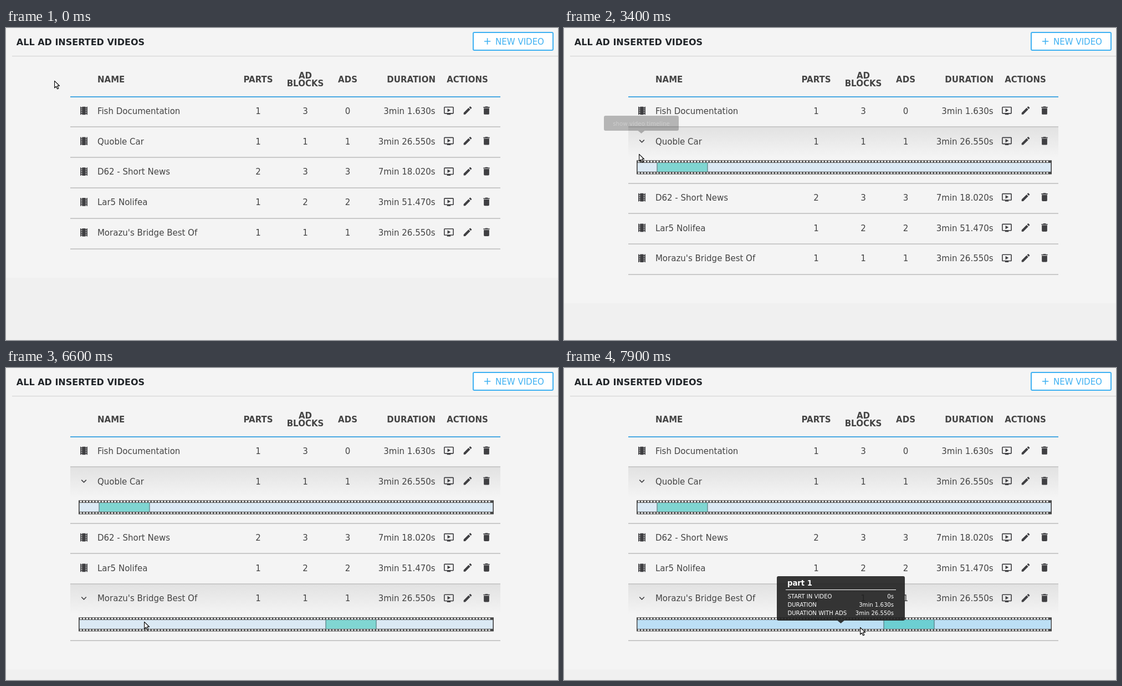
An HTML page with a canvas for the animation above (8000 ms loop, 996 px wide and 562 px high).

```html
<!DOCTYPE html>
<html lang="en">
<head>
<meta charset="utf-8">
<title>All ad inserted videos</title>
<style>
  html, body { margin: 0; width: 100%; height: 100%; overflow: hidden; background: #f0f0f0; }
  canvas { display: block; }
</style>
</head>
<body>
<canvas id="stage" width="996" height="562"></canvas>
<script>
const ctx = document.getElementById('stage').getContext('2d');
const LOOP = 8000, STEP = 100;
const LEFT = 116, RIGHT = 892, HEAD_LINE = 123.5, ROW_H = 54.8, EXTRA = 46.5;
const BLUE = '#3fb1f2', INK = '#444444', ICON_INK = '#3f3f42', PAGE = '#f4f4f4';
const FAMILY = '"DejaVu Sans", sans-serif';

const icons = {
  film: 'M18 3v2h-2V3H8v2H6V3H4v18h2v-2h2v2h8v-2h2v2h2V3h-2zM8 17H6v-2h2v2zm0-4H6v-2h2v2zm0-4H6V7h2v2zm10 8h-2v-2h2v2zm0-4h-2v-2h2v2zm0-4h-2V7h2v2z',
  chevron: 'M16.6 8.6L12 13.2 7.4 8.6 6 10l6 6 6-6z',
  play: 'M21 3H3c-1.1 0-2 .9-2 2v12c0 1.1.9 2 2 2h5v2h8v-2h5c1.1 0 2-.9 2-2V5c0-1.1-.9-2-2-2zm0 14H3V5h18v12zm-5-6l-7 4V7z',
  edit: 'M3 17.25V21h3.75L17.8 9.94l-3.75-3.75zM20.7 7.04c.4-.4.4-1 0-1.4l-2.33-2.35c-.4-.4-1-.4-1.4 0l-1.84 1.83 3.75 3.75z',
  trash: 'M6 19c0 1.1.9 2 2 2h8c1.1 0 2-.9 2-2V7H6zM19 4h-3.5l-1-1h-5l-1 1H5v2h14z',
  plus: 'M19 13h-6v6h-2v-6H5v-2h6V5h2v6h6z'
};
for (const name in icons) icons[name] = new Path2D(icons[name]);

const arrowCursor = new Path2D('M.6 .4V12.9L3.5 10.1 5.6 14.8 7.8 13.9 5.7 9.2H9.6z');
const handCursor = new Path2D('M-1 6V.6C-1-.9 1.4-.9 1.4 .6V4.2C2-.1 4 3.8 4 4.6 4.6 3.9 6.2 4.2 6.2 5.2 7 4.7 8.2 5 8.2 6.4V9.2L7 12.4H-.8L-4.2 8C-5 6.8-3.4 5.6-2.4 6.6L-1 8z');

const rows = [
  { name: 'Fish Documentation', cells: [1, 3, 0], time: '3min 1.630s' },
  { name: 'Quoble Car', cells: [1, 1, 1], time: '3min 26.550s', openAt: 2000, ad: 168 },
  { name: 'D62 - Short News', cells: [2, 3, 3], time: '7min 18.020s' },
  { name: 'Lar5 Nolifea', cells: [1, 2, 2], time: '3min 51.470s' },
  { name: "Morazu's Bridge Best Of", cells: [1, 1, 1], time: '3min 26.550s', openAt: 4800, ad: 577, hoverAt: 6700 }
];
const columns = [455, 540, 616.5];

const linear = u => u;
const easeIn = u => u ** 1.2;
const easeOut = u => 1 - (1 - u) ** 1.6;
const smooth = u => u * u * (3 - 2 * u);
const clamp = u => Math.max(0, Math.min(1, u));

// Pointer stops: time, x, y, easing towards the stop
const path = [
  [0, 87, 95], [100, 89, 92], [300, 89, 92], [1200, 119, 185, easeIn], [1500, 136, 202, easeOut],
  [3200, 136, 202], [4100, 131, 403, smooth], [4400, 137, 410, easeOut],
  [5500, 137, 410], [6400, 233, 450, easeIn], [6600, 249, 457], [6900, 266, 462.5, easeOut],
  [7200, 266, 462.5], [7300, 273, 463], [7400, 300, 463.6], [7700, 454, 465.2],
  [7800, 499, 465.7], [7900, 534, 467]
];

function pointer(t) {
  let i = path.findIndex(p => p[0] >= t);
  if (i < 0) i = path.length - 1;
  if (i === 0) return { x: path[0][1], y: path[0][2] };
  const [t0, x0, y0] = path[i - 1];
  const [t1, x1, y1, ease = linear] = path[i];
  const u = ease(clamp((t - t0) / (t1 - t0)));
  return { x: x0 + (x1 - x0) * u, y: y0 + (y1 - y0) * u };
}

function fill(color, x, y, w, h) {
  ctx.fillStyle = color;
  ctx.fillRect(x, y, w, h);
}

function text(str, x, y, { size = 15, bold = false, color = INK, align = 'left' } = {}) {
  ctx.font = `${bold ? 'bold ' : ''}${size}px ${FAMILY}`;
  ctx.fillStyle = color;
  ctx.textAlign = align;
  ctx.fillText(str, x, y);
}

function icon(name, x, y, color = ICON_INK) {
  const scale = 0.81;
  ctx.save();
  ctx.translate(x, y);
  ctx.scale(scale, scale);
  ctx.translate(-12, -12);
  ctx.fillStyle = color;
  ctx.fill(icons[name], 'evenodd');
  ctx.restore();
}

function drawHeader() {
  text('ALL AD INSERTED VIDEOS', 18.8, 31, { size: 16, bold: true, color: '#212529' });
  fill('#d6d6d6', 11, 50, 985, 1.3);

  ctx.beginPath();
  ctx.roundRect(843, 8, 144, 32, 2);
  ctx.fillStyle = '#ffffff';
  ctx.fill();
  ctx.strokeStyle = BLUE;
  ctx.lineWidth = 2;
  ctx.stroke();
  icon('plus', 868.6, 24, BLUE);
  text('NEW VIDEO', 883.1, 30, { color: BLUE });

  const head = { bold: true };
  const mid = { bold: true, align: 'center' };
  text('NAME', 165, 98, head);
  text('PARTS', 455, 98, mid);
  text('AD', 540, 91, mid);
  text('BLOCKS', 540, 105, mid);
  text('ADS', 616.5, 98, mid);
  text('DURATION', 775, 98, { bold: true, align: 'right' });
  text('ACTIONS', 832.5, 98, mid);
  fill('#4aa9e2', LEFT, 123, RIGHT - LEFT, 2);
}

function drawFilm(y, ad, lit) {
  const x = 131, w = 749, h = 25.2, band = 4.6;
  fill('#484848', x, y, w, h);
  fill('#dbe9f4', x + 1.7, y + band, w - 3.4, h - 2 * band);
  fill('#80d6d2', ad, y + band, 91, h - 2 * band);
  if (lit) {
    ctx.globalAlpha = lit;
    fill('#bcdff5', x + 1.7, y + band, w - 3.4, h - 2 * band);
    fill('#6ccfd2', ad, y + band, 91, h - 2 * band);
    ctx.globalAlpha = 1;
  }
  for (const edge of [ad - 0.5, ad + 90.5]) fill('#47696d', edge, y + band, 1, h - 2 * band);
  for (let hx = x + 2.5; hx < x + w - 4; hx += 5.625) {
    fill('#ffffff', hx, y + 1, 3.2, 2.6);
    fill('#ffffff', hx, y + h - 3.6, 3.2, 2.6);
  }
}

function drawRow(row, top, t, mouse) {
  const mid = top + 25.5, base = Math.round(mid + 5.7);
  const open = t >= row.openAt;
  const hover = overIcon(mouse, mid);
  if (open) {
    const edge = Math.round(top + 1);
    const shade = ctx.createLinearGradient(0, edge, 0, top + ROW_H);
    shade.addColorStop(0, '#e2e2e2');
    shade.addColorStop(1, PAGE);
    fill(shade, LEFT, edge, RIGHT - LEFT, ROW_H - 1);
    drawFilm(top + ROW_H + 5.2, row.ad, row.hoverAt ? clamp((t - row.hoverAt + STEP) / 200) : 0);
  }
  icon(open ? 'chevron' : 'film', 140.5, mid, hover ? BLUE : ICON_INK);
  text(row.name, 164.9, base);
  row.cells.forEach((n, i) => text(n, columns[i], base, { align: 'center' }));
  text(row.time, 774.6, base, { align: 'right' });
  icon('play', 799, mid);
  icon('edit', 833, mid - 0.5);
  icon('trash', 867, mid - 0.5);
  return top + ROW_H + (open ? EXTRA : 0);
}

function overIcon(p, mid) {
  return Math.abs(p.x - 140.5) < 7 && Math.abs(p.y - mid) < 9;
}

function bubble(x, y, w, h, alpha) {
  const cx = x + w / 2;
  ctx.globalAlpha = alpha * 0.9;
  ctx.fillStyle = '#212121';
  ctx.beginPath();
  ctx.roundRect(x, y, w, h, 3);
  ctx.moveTo(cx - 6, y + h);
  ctx.lineTo(cx + 6, y + h);
  ctx.lineTo(cx, y + h + 5);
  ctx.fill();
  ctx.globalAlpha = alpha;
}

function drawHint(t, start, end, y) {
  const alpha = clamp((t - start + STEP) / 300) * clamp(1 - (t - end + STEP) / 300);
  if (!alpha) return;
  bubble(72, y, 135, 27, alpha);
  text('show video timeline', 139.5, y + 17.7, { size: 10.25, color: '#fff', align: 'center' });
  ctx.globalAlpha = 1;
}

function drawPartInfo(t) {
  const alpha = clamp((t - 6700 + STEP) / 300);
  if (!alpha) return;
  const at = pointer(t - STEP);
  const x = Math.round(at.x - 115.5), y = Math.round(at.y - 90.5);
  bubble(x, y, 231, 80, alpha);
  text('part 1', x + 19, y + 17.3, { size: 13.2, bold: true, color: '#fff' });
  fill('#ffffff', x + 16, y + 24, 199, 1);
  const facts = [['START IN VIDEO', '0s'], ['DURATION', '3min 1.630s'], ['DURATION WITH ADS', '3min 26.550s']];
  facts.forEach(([label, value], i) => {
    const base = y + 40 + i * 15;
    text(label, x + 19.4, base, { size: 10.1, color: '#fff' });
    text(value, x + 211, base, { size: 10.1, color: '#fff', align: 'right' });
  });
  ctx.globalAlpha = 1;
}

function drawPointer(p, hand) {
  ctx.save();
  ctx.translate(Math.round(p.x), Math.round(p.y));
  ctx.lineJoin = 'round';
  ctx.lineWidth = 1.2;
  ctx.strokeStyle = '#111';
  ctx.fillStyle = '#fff';
  const shape = hand ? handCursor : arrowCursor;
  ctx.fill(shape);
  ctx.stroke(shape);
  ctx.restore();
}

function draw(t) {
  const mouse = pointer(t);
  const opened = rows.filter(r => t >= r.openAt).length;
  fill('#f0f0f0', 0, 0, 996, 562);
  fill(PAGE, 0, 0, 996, Math.round(449.6 + EXTRA * opened));
  drawHeader();

  let top = HEAD_LINE, hand = false;
  for (const row of rows) {
    hand = hand || overIcon(mouse, top + 25.5);
    top = drawRow(row, top, t, mouse);
    fill('#c9c9c9', LEFT, Math.round(top - 1), RIGHT - LEFT, 2);
  }
  drawHint(t, 2000, 3300, 158);
  drawHint(t, 4800, 5600, 369);
  drawPartInfo(t);
  drawPointer(mouse, hand);
}

function frame() {
  const t = performance.now() % LOOP;
  draw(Math.floor(t / STEP) * STEP);
  requestAnimationFrame(frame);
}
frame();
</script>
</body>
</html>
```
